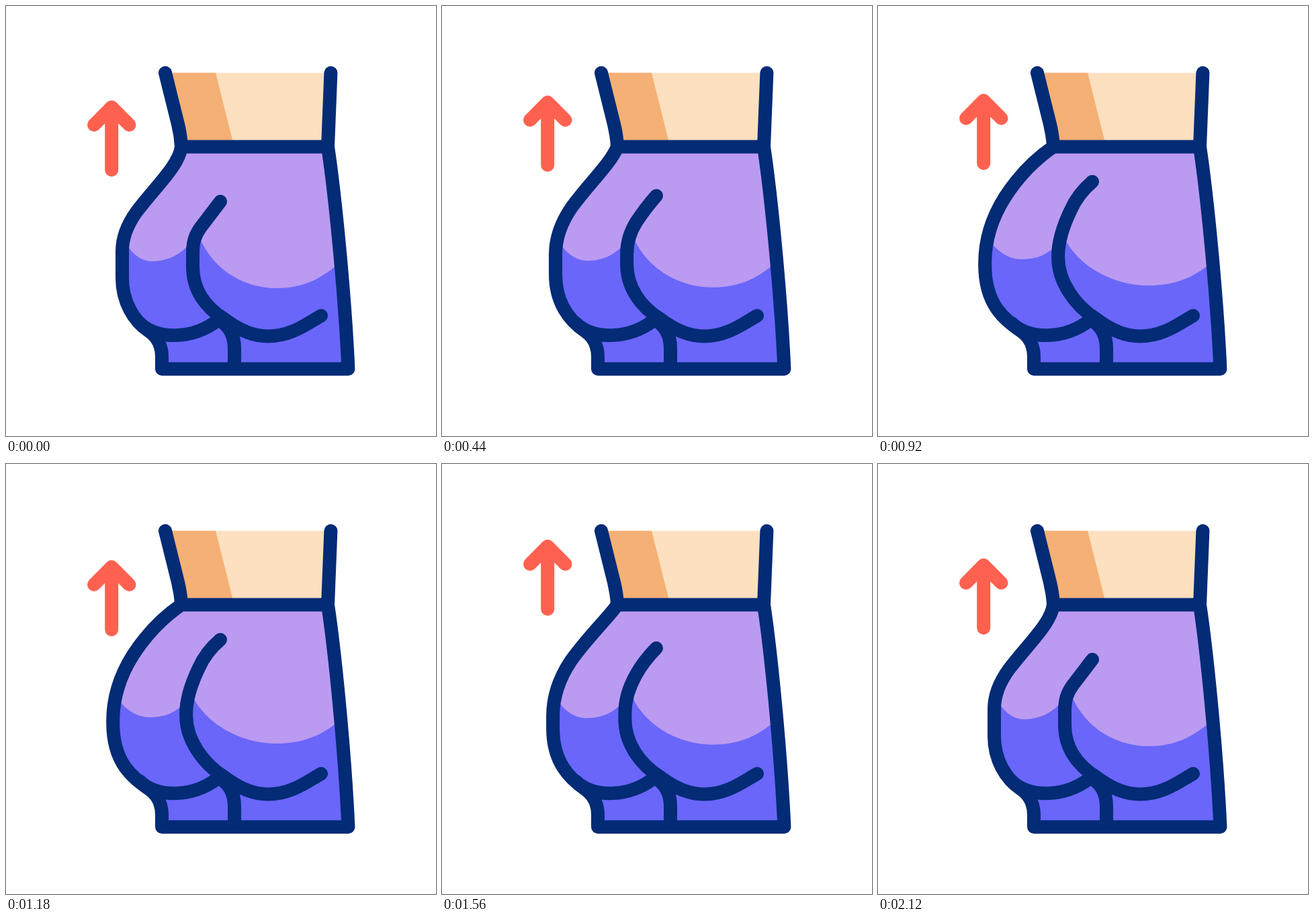
Write an HTML page that moves like this. It is 640x640 px and loops after 2400 ms.

```html
<!DOCTYPE html>
<html lang="en">
<head>
<meta charset="utf-8">
<title>Lift icon</title>
<style>
  html, body { margin: 0; height: 100%; overflow: hidden; background: #fff; }
  svg { display: block; width: 100%; height: 100%; }
  .line, .arrow { fill: none; stroke-width: 20; stroke-linecap: round; stroke-linejoin: round; }
  .line { stroke: #032b76; }
  .arrow { stroke: #ff6150; animation: bob 2400ms cubic-bezier(.37, 0, .63, 1) infinite; }
  .body, .shade, .fold { animation: 2400ms cubic-bezier(.667, 0, .333, 1) infinite; }
  .body { animation-name: body; }
  .shade { animation-name: shade; }
  .fold { animation-name: fold; }

  /* Resting shape, lifted shape, then back to rest until the loop ends */
  @keyframes body {
    0%, 88.33%, 100% { d: path("M261 209.6C257 238 225 266 194.5 306C180 326 173 345 173 365L173 405C173 440 190 469 213 484C226 493 232 507 232 522L232 540.3L509.4 540.3C505 440 491 290 479 209.6Z"); }
    43.67% { d: path("M261 209.6C235 227 209 253 189 284C170 314 159 347 159 383L159 385C159 445 188 466 213 484C226 493 232 507 232 522L232 540.3L509.4 540.3C505 440 491 290 479 209.6Z"); }
  }
  @keyframes shade {
    0%, 88.33%, 100% { d: path("M170 340C185 368 200 380 218 380C240 380 260 370 273 354L283 332C302 389 350 420 403 420C440 420 470 407 497 381L520 560L140 560Z"); }
    43.67% { d: path("M158 337C173 365 195 377 213 377C235 377 250 371 263 358L274 337C292 386 350 416 403 416C440 416 470 405 497 381L520 560L140 560Z"); }
  }
  @keyframes fold {
    0%, 88.33%, 100% { d: path("M319 291C309 304 300 316 290 329C281 341 278 352 278 368L278 388C278 422 296 448 325 466C346 482 367 491.5 390 491.5C424 491.5 446 474 469 461"); }
    43.67% { d: path("M319 261C306 272 295 285 287 303C275 328 268 350 268 372L268 374C268 410 293 446 325 466C346 482 367 491.5 390 491.5C424 491.5 446 474 469 461"); }
  }
  @keyframes bob {
    0%, 88.33%, 100% { transform: translateY(0); }
    10.42% { transform: translateY(3px); }
    31.46% { transform: translateY(-30px); }
    44.79% { transform: translateY(8px); }
    62.5% { transform: translateY(-30px); }
    79.17% { transform: translateY(4px); }
  }
</style>
</head>
<body>
<svg viewBox="0 0 640 640">
  <clipPath id="inside"><path class="body"/></clipPath>

  <path fill="#fce0bf" d="M237 99.5H483L479 209H261Z"/>
  <path fill="#f5b075" d="M237 99.5H312L339.5 209H261Z"/>

  <path class="body" fill="#bb9af2"/>
  <g clip-path="url(#inside)"><path class="shade" fill="#6966f9"/></g>

  <path class="line" d="M237 99.5L256 176Q260 192 261 209.6M483.4 99.5L479 209.6"/>
  <path class="line" d="M199 472C222 496 278 498 316 467C332 475 340 490 340 510V540.3"/>
  <path class="line body"/>
  <path class="line fold"/>

  <path class="arrow" d="M157.2 244V150.5M131 177L157.2 150.5L183.5 177"/>
</svg>
</body>
</html>
```
